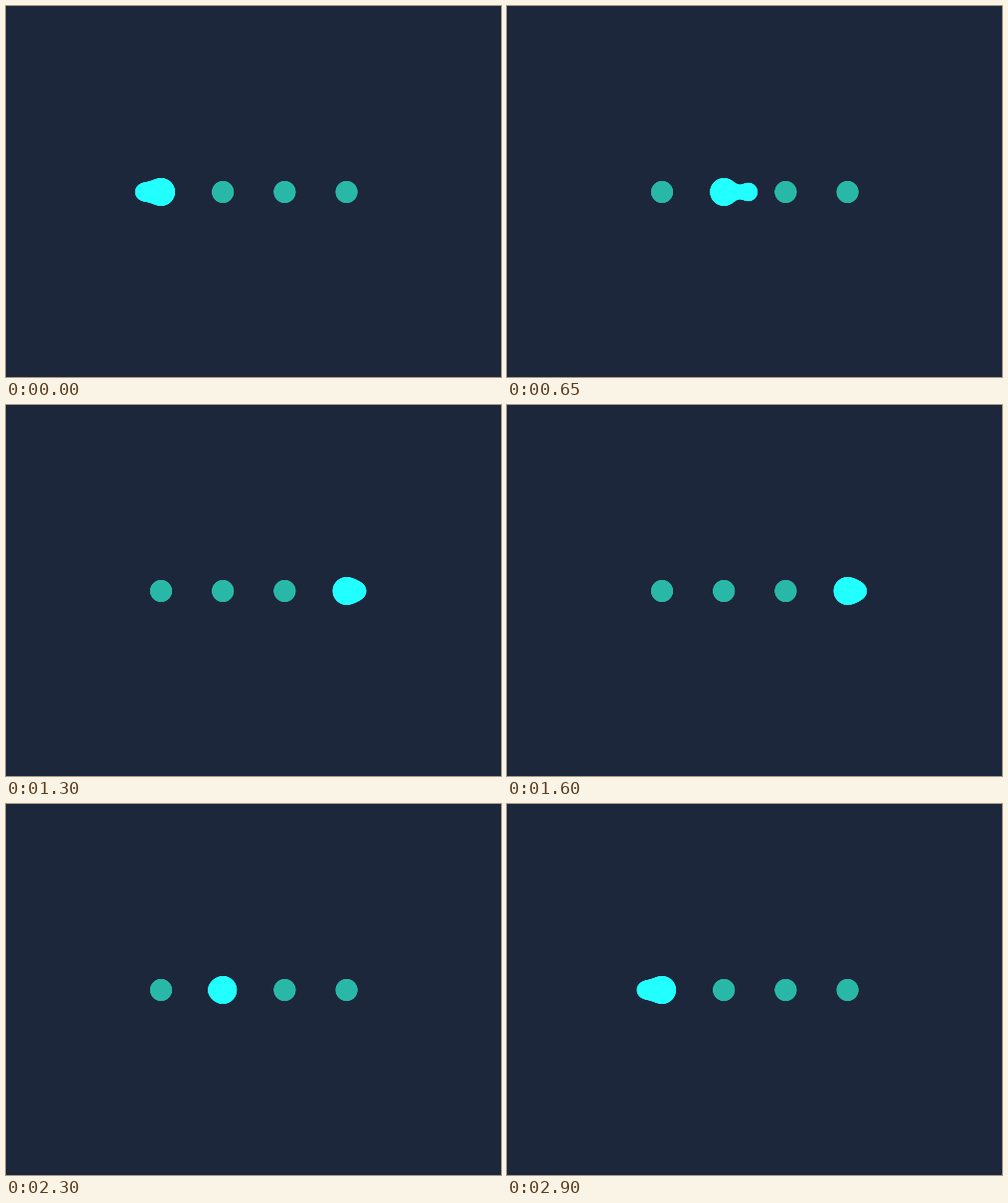
These frames come from a looping animation (498x373 px, 2950 ms). An HTML page:

```html
<!DOCTYPE html>
<html lang="en">
<head>
<meta charset="utf-8">
<title>Gooey dots loader</title>
<style>
  :root { --rest: #29b8a7; --lit: #22ffff; --loop: 2950ms; }
  html, body { margin: 0; width: 100%; height: 100%; overflow: hidden; background: #1d273c; }
  svg { display: block; width: 100%; height: 100%; }

  .dot {
    fill: var(--rest);
    transform-box: fill-box;
    transform-origin: center;
    animation: var(--name) var(--loop) linear infinite;
  }
  .mover { fill: var(--lit); animation: travel var(--loop) linear infinite; }

  /* Out to the right and back, easings joined so the speed stays continuous */
  @keyframes travel {
    0%      { transform: translateX(139px);   animation-timing-function: cubic-bezier(.333, .075, .667, .574); }
    11.864% { transform: translateX(185.5px); animation-timing-function: cubic-bezier(.333, .298, .667, .719); }
    35.593% { transform: translateX(318.6px); animation-timing-function: cubic-bezier(.333, .503, .667, 1); }
    49.153% { transform: translateX(361px);   animation-timing-function: cubic-bezier(.333, 0, .667, .125); }
    54.237% { transform: translateX(353px);   animation-timing-function: cubic-bezier(.333, .184, .667, .723); }
    64.407% { transform: translateX(277px);   animation-timing-function: cubic-bezier(.333, .435, .667, .71); }
    77.966% { transform: translateX(212.5px); animation-timing-function: cubic-bezier(.333, .413, .667, 1); }
    100%    { transform: translateX(139px); }
  }

  /* Each dot swells and brightens while the mover passes */
  @keyframes first {
    0%, 6.8%, 89.5%, 100% { fill: var(--lit); transform: scale(1.25); }
    9.5%, 86.8% { fill: var(--rest); transform: scale(1); }
  }
  @keyframes second {
    0%, 15.3%, 27.5%, 71.9%, 86.8%, 100% { fill: var(--rest); transform: scale(1); }
    18%, 24.7%, 74.6%, 84% { fill: var(--lit); transform: scale(1.25); }
  }
  @keyframes third {
    0%, 26.1%, 39%, 60.3%, 72.5%, 100% { fill: var(--rest); transform: scale(1); }
    28.8%, 36.3%, 63%, 69.8% { fill: var(--lit); transform: scale(1.25); }
  }
  @keyframes fourth {
    0%, 37%, 61.7%, 100% { fill: var(--rest); transform: scale(1); }
    39.7%, 59% { fill: var(--lit); transform: scale(1.25); }
  }
</style>
</head>
<body>
<svg viewBox="0 0 498 373">
  <filter id="goo" filterUnits="userSpaceOnUse" x="90" y="140" width="320" height="94" color-interpolation-filters="sRGB">
    <feGaussianBlur stdDeviation="5"/>
    <feColorMatrix values="1 0 0 0 0  0 1 0 0 0  0 0 1 0 0  0 0 0 20 -8"/>
  </filter>
  <g filter="url(#goo)">
    <circle class="dot" style="--name: first" cx="156" cy="187" r="11.2"/>
    <circle class="dot" style="--name: second" cx="218.2" cy="187" r="11.2"/>
    <circle class="dot" style="--name: third" cx="280.4" cy="187" r="11.2"/>
    <circle class="dot" style="--name: fourth" cx="342.6" cy="187" r="11.2"/>
    <circle class="mover" cy="187" r="9.7"/>
  </g>
</svg>
</body>
</html>
```
